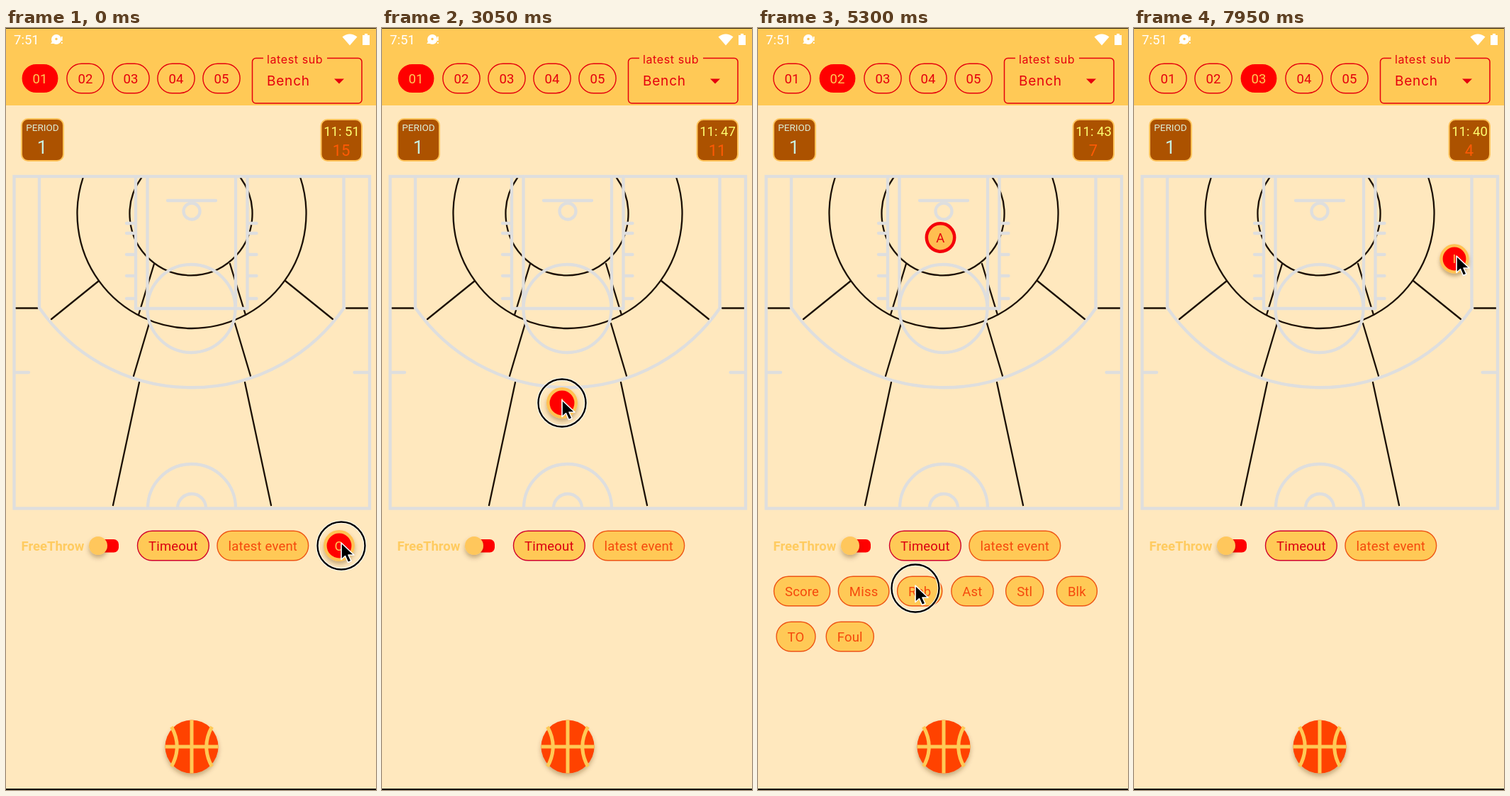
An HTML page that plays this animation: 522x1073 px, repeating every 8000 ms.

```html
<!DOCTYPE html>
<html lang="en">
<head>
<meta charset="utf-8">
<title>Basketball stat tracker</title>
<style>
html, body { margin: 0; width: 100%; height: 100%; overflow: hidden; background: #ffe8be; }
svg { display: block; width: 100%; height: 100%; font-family: Roboto, sans-serif; }
.chip rect { stroke-width: 1.4; }
.chip text, .marker text { font-size: 18.5px; letter-spacing: .2px; text-anchor: middle; }
.player rect { fill: #ffc956; stroke: #e5000d; }
.player text { fill: #e5000d; }
.player.on rect { fill: #f00; stroke: #ffc956; }
.player.on text { fill: #ffc956; }
.event rect { fill: #ffc956; stroke: #ee5312; }
.event text { fill: #f5480c; }
.timeout rect { fill: #ffc956; stroke: #d1002b; }
.timeout text { fill: #dc0010; }
.marker circle { fill: #f00; stroke: #ffc253; stroke-width: 4.5; }
.marker text { fill: #ffc956; }
.marker.on circle { fill: #ffbe50; stroke: #f4000a; }
.marker.on text { fill: #e5000d; }
.dark { fill: none; stroke: #1c1005; stroke-width: 2.3; stroke-linecap: round; }
.paint { fill: none; stroke: #dedede; stroke-width: 4.3; stroke-linecap: round; }
.mid { text-anchor: middle; }
</style>
</head>
<body>
<svg viewBox="0 0 522 1073" preserveAspectRatio="none">
  <defs>
    <filter id="soft" x="-40%" y="-40%" width="180%" height="190%">
      <feDropShadow dx="0" dy="4" stdDeviation="3" flood-color="#5a3000" flood-opacity=".35"/>
    </filter>
  </defs>
  <rect width="522" height="1073" fill="#ffe8be"/>
  <rect width="522" height="109" fill="#ffc956"/>
  <rect width="522" height="1" fill="#2a2213"/>
  <rect y="1071" width="522" height="2" fill="#0c0a06"/>

  <!-- status bar -->
  <g fill="#fff">
    <text x="11" y="23" font-size="18.5">7:51</text>
    <circle cx="71" cy="16" r="7"/>
    <path d="M63 22l3-4 4 4zM78 12h1.6v6h-1.6zM78 20h1.6v2h-1.6z"/>
    <circle cx="71" cy="15.5" r="1.7" fill="#ffc956"/>
    <path d="M474.5 12.5Q485 4.5 495.5 12.5L485 24.5z"/>
    <path d="M506 8h4v2h3v14h-10V10h3z"/>
  </g>

  <!-- bench selector -->
  <g fill="#e5000d" font-family="Inter, sans-serif">
    <rect x="347.5" y="42.5" width="154.5" height="63.5" rx="5" fill="none" stroke="#e5000d" stroke-width="1.5"/>
    <rect x="363" y="40" width="90" height="5" fill="#ffc956"/>
    <text x="368" y="50" font-size="16" letter-spacing=".6">latest sub</text>
    <text x="368" y="81" font-size="19" letter-spacing=".8">Bench</text>
    <path d="M463 71.5h14l-7 7z"/>
  </g>

  <!-- scoreboard -->
  <g fill="#ac5200" stroke="#ffc35a" stroke-width="2">
    <rect x="22" y="128" width="59" height="59" rx="9"/>
    <rect x="444.5" y="129" width="57.5" height="58" rx="9"/>
  </g>
  <g class="mid">
    <text x="51.5" y="144.5" font-size="13.5" fill="#dcecd6">PERIOD</text>
    <text x="51" y="177" font-size="26" fill="#c9efdf">1</text>
    <text id="clock" x="473.5" y="152" font-size="18.5" fill="#ffff70"></text>
    <text id="shot" x="473" y="180" font-size="22" fill="#ff5a05"></text>
  </g>

  <!-- court: left half plus its mirror image -->
  <g class="dark">
    <path d="M108.6 211A161.5 161.5 0 1 0 415.4 211M191 211A86.5 86.5 0 1 0 331 211"/>
    <path id="zones" d="M131 356L64 410M209 332L187 404M202 416L180 490M188 499L151 672M14 394.5H45"/>
    <use href="#zones" transform="matrix(-1 0 0 1 525 0)"/>
  </g>
  <g class="paint">
    <rect x="11.5" y="209" width="501.500" height="467.5"/>
    <path id="lanes"/>
    <use href="#lanes" transform="matrix(-1 0 0 1 523.5 0)"/>
    <circle cx="261.5" cy="395" r="62"/>
    <circle cx="262" cy="258" r="11.5"/>
    <path d="M228 243H296M183 395H340M47 394A262 262 0 0 0 477 394"/>
    <path d="M200 676A62 62 0 0 1 324 676M242 676A20 20 0 0 1 282 676"/>
  </g>

  <!-- controls -->
  <text x="21.5" y="736" font-size="18.5" font-weight="700" fill="#ffcb60">FreeThrow</text>
  <rect x="120" y="720" width="39" height="18.5" rx="7" fill="#f00"/>
  <circle cx="130" cy="729" r="13" fill="#ffc75c" filter="url(#soft)"/>
  <g id="chips"></g>
  <g id="menu"></g>

  <!-- ball -->
  <g fill="none" stroke="#ffc956" stroke-width="5">
    <circle cx="262" cy="1012" r="37.5" fill="#ff4300" stroke="none" filter="url(#soft)"/>
    <path d="M262 974.5v75M224.5 1012h75M233.5 984q15.500 28 0 56M290.5 984q-15.500 28 0 56"/>
  </g>

  <g id="markers"></g>

  <g id="cursor">
    <g id="ring" fill="none">
      <circle cy="3" r="33.5" stroke="#fff" stroke-width="4.5" opacity=".8"/>
      <circle cy="3" r="33.5" stroke="#000" stroke-width="2.3"/>
    </g>
    <path d="M0-1v23.500l5.500-5l4 9l4.500-2l-4-8.500h8z" stroke="#fff" stroke-width="1.6" stroke-linejoin="round"/>
  </g>
</svg>
<script>
const LOOP = 8000;
const $ = id => document.getElementById(id);
const clamp = k => Math.min(1, Math.max(0, k));

function add(parent, tag, attrs, text) {
  const el = document.createElementNS('http://www.w3.org/2000/svg', tag);
  for (const key in attrs) el.setAttribute(key, attrs[key]);
  if (text) el.textContent = text;
  return parent.appendChild(el);
}

// A chip is its label plus padding; returns the group and its width.
function chip(parent, label, kind) {
  const g = add(parent, 'g', { class: 'chip ' + kind });
  const box = add(g, 'rect', { y: -20.7, height: 41.4, rx: 20.7 });
  const width = add(g, 'text', { y: 6.5 }, label).getComputedTextLength() + 32;
  box.setAttribute('x', .5 - width / 2);
  box.setAttribute('width', width - 1);
  return { g, width };
}

const place = (g, x, y) => g.setAttribute('transform', `translate(${x} ${y})`);

// Lays chips in a row; narrow ones keep a minimum touch slot.
function row(parent, x, y, labels, kindOf = () => 'event') {
  for (const label of labels) {
    const { g, width } = chip(parent, label, kindOf(label));
    const slot = Math.max(63, width);
    place(g, x + slot / 2, y);
    x += slot + 10.7;
  }
}

const players = [0, 1, 2, 3, 4].map(i => {
  const { g } = chip($('chips'), '0' + (i + 1), 'player');
  place(g, 48 + 64 * i, 71);
  return g;
});
row($('chips'), 185, 729, ['Timeout', 'latest event'], s => s === 'Timeout' ? 'timeout' : 'event');
row($('menu'), 22, 793, ['Score', 'Miss', 'Reb', 'Ast', 'Stl', 'Blk']);
row($('menu'), 22, 857, ['TO', 'Foul']);

$('lanes').setAttribute('d', 'M183 209V395M199.5 209V395M47 209V394M13 485H32' +
  [275, 289, 319, 349, 381].map(y => `M170 ${y}H183`).join(''));

// Clicks as [time, x, y]. After the first, each play repeats five:
// choose player, drop marker, pick marker, choose event, mark the spot.
const STEPS = 5;
const chipSpot = i => [46 + 60 * i, 74];
const clicks = [
  [0, 473, 726],
  [700, ...chipSpot(0)], [1300, 254, 525], [1450, 254, 525], [2450, 62, 790], [3000, 254, 525],
  [3820, ...chipSpot(1)], [4280, 247, 270], [4650, 257, 285], [5260, 222, 786], [6200, 377, 319],
  [7220, ...chipSpot(2)], [7700, 455, 322]
];
const REST_BEFORE = 150, REST_AFTER = 180, RING = 140, LAG = 90, LINGER = 450;

// step is the click that creates the marker
const markers = [
  { step: 0, label: 'O', x: 470, y: 729 },
  { step: 2, label: 'I', x: 254, y: 528 },
  { step: 7, label: 'A', x: 257.5, y: 295, flat: true },
  { step: 10, label: 'A', x: 367, y: 320, flat: true },
  { step: 12, label: 'I', x: 452, y: 325 }
];
for (const m of markers) {
  m.el = add($('markers'), 'g', { class: 'marker' });
  if (!m.flat) m.el.setAttribute('filter', 'url(#soft)');
  add(m.el, 'circle', { r: 19.7 });
  add(m.el, 'text', { y: 6.5 }, m.label);
  const last = clicks[Math.ceil(m.step / STEPS) * STEPS];
  m.from = m.step ? clicks[m.step][0] + LAG : -LOOP;
  m.to = last ? last[0] + LINGER : LOOP;
}

const show = (el, on) => { el.style.display = on ? '' : 'none'; };
const stepAt = t => Math.max(0, clicks.findLastIndex(c => c[0] <= t));

function pointerAt(t) {
  const i = stepAt(t);
  const [t0, x0, y0] = clicks[i], [t1, x1, y1] = clicks[i + 1] || [LOOP + 999, x0, y0];
  const leave = t0 + REST_AFTER, arrive = Math.max(leave + 30, t1 - REST_BEFORE);
  const k = clamp((t - leave) / (arrive - leave)), ease = k * (2 - k);
  return [x0 + (x1 - x0) * ease, y0 + (y1 - y0) * ease];
}

function draw(t) {
  const ticks = Math.floor((t + 550) / 725);
  $('clock').textContent = '11: ' + (51 - ticks);
  $('shot').textContent = 15 - ticks;

  const step = stepAt(t - LAG);
  const picking = step % STEPS === 3;
  const active = Math.max(1, Math.ceil(step / STEPS)) - 1;
  players.forEach((p, i) => p.classList.toggle('on', i === active));
  show($('menu'), picking);

  for (const m of markers) {
    const k = clamp((t - m.from) / 400);
    show(m.el, t >= m.from && t < m.to);
    m.el.classList.toggle('on', picking && m.step === step - 1);
    m.el.style.opacity = clamp(.73 + k);
    m.el.setAttribute('transform', `translate(${m.x} ${m.y}) scale(${.9 + .1 * k})`);
  }

  show($('ring'), t - clicks[stepAt(t)][0] < RING);
  place($('cursor'), ...pointerAt(t));
}

let start;
function frame(now) {
  start ??= now;
  draw((now - start) % LOOP);
  requestAnimationFrame(frame);
}
draw(0);
requestAnimationFrame(frame);
</script>
</body>
</html>
```
